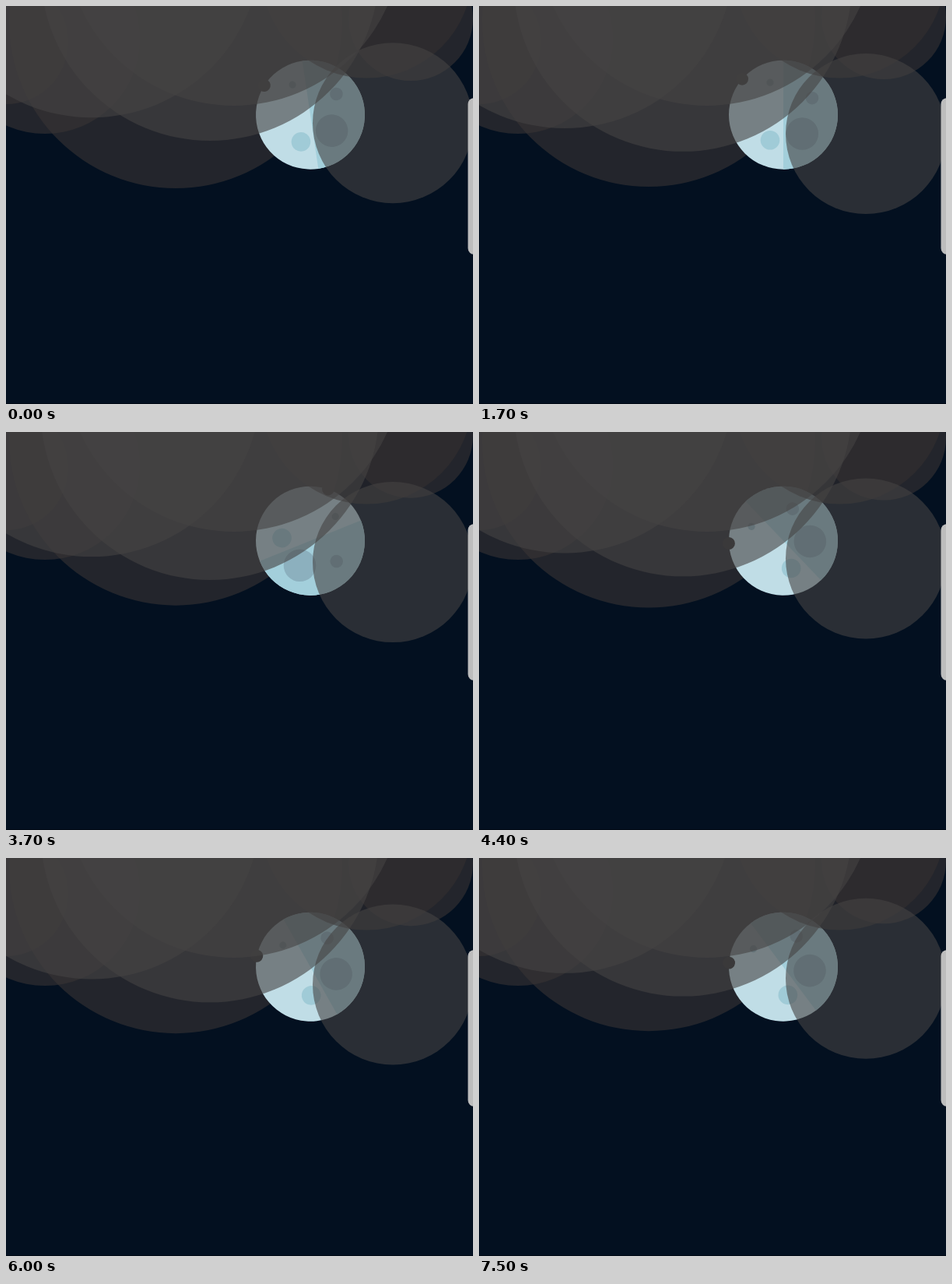
Recreate the animation shown at these times as an HTML page with a canvas. Size 600 by 511 pixels, loop 7600 ms.

```html
<!DOCTYPE html>
<html lang="en">
<head>
<meta charset="utf-8">
<title>Cloudy moon</title>
<style>
  html, body { margin: 0; width: 100%; height: 100%; overflow: hidden; background: #031020; }
  canvas { display: block; }
</style>
</head>
<body>
<canvas id="sky" width="600" height="511"></canvas>
<script>
const ctx = document.getElementById('sky').getContext('2d');
const LOOP = 7600, STEP = 100;
const DARK = 'rgba(58,53,53,.6)';
const DIM = 'rgba(52,47,48,.6)';
const GREY = 'rgba(69,68,68,.6)';

function disc(x, y, r, fill) {
  ctx.fillStyle = fill;
  ctx.beginPath();
  ctx.arc(x, y, r, 0, Math.PI * 2);
  ctx.fill();
}

// Linear back-and-forth, 0 to 1 to 0 over one period.
function swing(t, period) {
  const p = (t / period) % 1;
  return p < 0.5 ? p * 2 : 2 - p * 2;
}

// cubic-bezier(.42, 0, .58, 1)
function easeInOut(x) {
  let lo = 0, hi = 1;
  for (let i = 0; i < 24; i++) {
    const u = (lo + hi) / 2, v = 1 - u;
    const bx = 1.26 * u * v * v + 1.74 * u * u * v + u * u * u;
    if (bx < x) lo = u; else hi = u;
  }
  return lo * lo * (3 - 2 * lo);
}

function moon(t) {
  const turn = (t / 1535 + 0.891) % 1;
  ctx.save();
  ctx.translate(391, 139.7);
  ctx.rotate(easeInOut(turn) * Math.PI * 2);
  disc(0, 0, 70, '#c0dde6');
  ctx.fillStyle = '#a3cfdb';
  ctx.beginPath();
  ctx.arc(0, 0, 70, -Math.PI / 2, Math.PI / 2);
  ctx.fill();
  disc(-17, 32.5, 12.3, '#a0cbd7');
  disc(24.3, 24.3, 20.8, '#8cb0be');
  disc(37, -21.5, 8.3, '#8cb0be');
  disc(-17, -41.5, 4.6, '#93b9c7');
  disc(-53, -46, 8, '#2a2a2d');
  ctx.restore();
}

function draw(t) {
  const up = -20 * swing(t + 60, 1620);
  const down = 20 * swing(t, 2600);

  ctx.fillStyle = '#031020';
  ctx.fillRect(0, 0, 600, 511);

  // clouds behind the moon
  disc(50, 42, 122, DARK);
  disc(0, 46, 80, DARK);
  disc(218, 21.5 + up * 1, 214, DARK);
  disc(520, 17.5 + up, 80, DARK);

  moon(t);

  // clouds in front
  disc(463.5, -43.3, 135.8, DIM);
  disc(292.5, -88.5, 216.5, GREY);
  disc(262, -44.3 + down, 217.3, GREY);
  disc(110, -74.3 + down, 217.5, GREY);
  disc(497, 150.2 + down, 103, GREY);

  // panel at the right edge
  ctx.fillStyle = '#bdbdbd';
  ctx.beginPath();
  ctx.roundRect(593.5, 118, 40, 201, 8);
  ctx.fill();

  ctx.fillStyle = '#020a15';
  ctx.fillRect(0, 510, 600, 1);
}

let start = null;
function frame(now) {
  if (start === null) start = now;
  const t = (now - start) % LOOP;
  draw(Math.floor(t / STEP) * STEP);
  requestAnimationFrame(frame);
}
draw(0);
requestAnimationFrame(frame);
</script>
</body>
</html>
```
